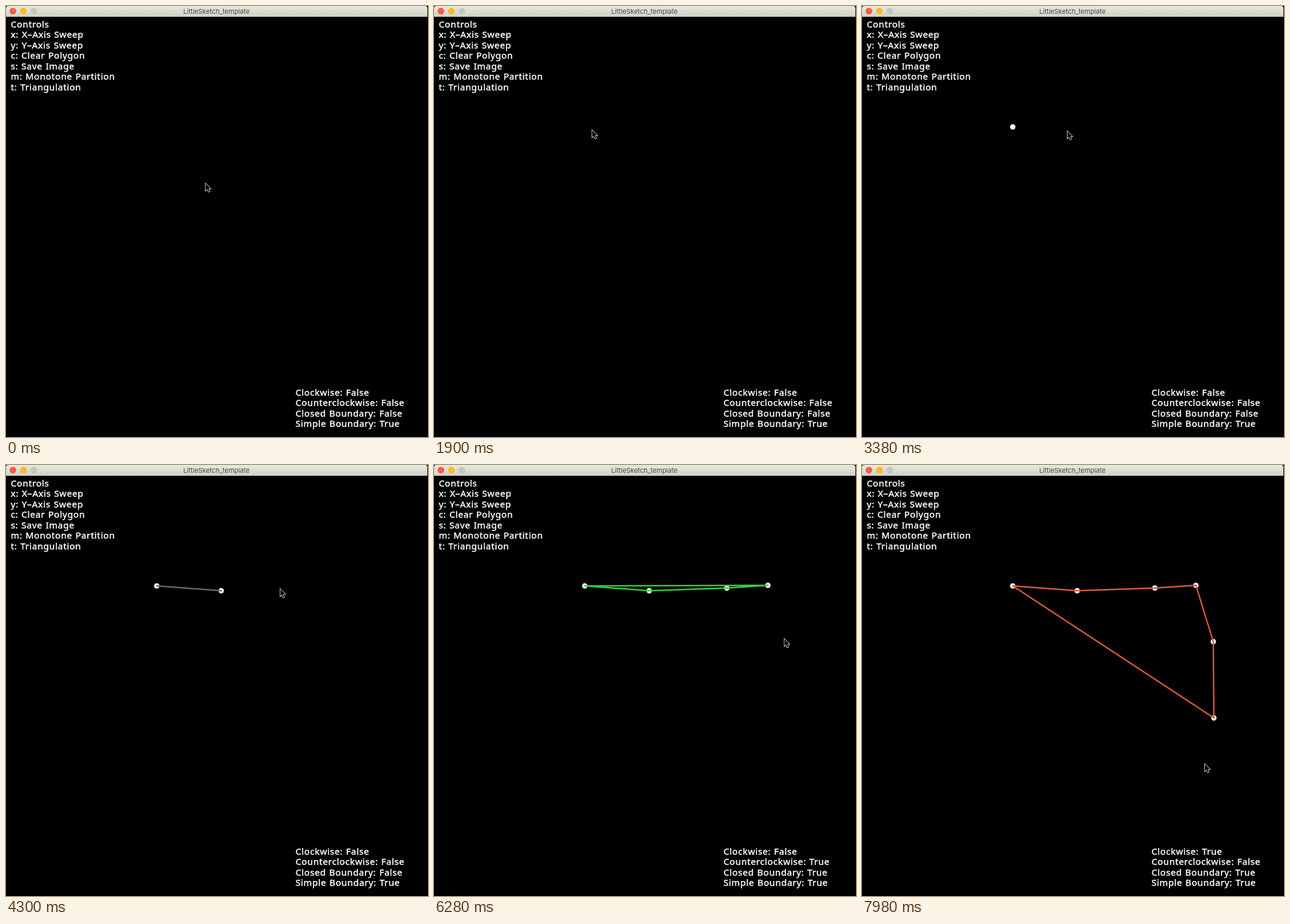
An HTML page with a canvas for the animation above (8000 ms loop, 704 by 720 pixels).

```html
<!DOCTYPE html>
<html lang="en">
<head>
<meta charset="utf-8">
<title>Polygon editor</title>
<style>
  html, body { margin: 0; width: 100%; height: 100%; overflow: hidden; background: #000; }
  canvas { display: block; }
</style>
</head>
<body>
<canvas id="stage" width="704" height="720"></canvas>
<script>
const ctx = document.getElementById('stage').getContext('2d');
const LOOP = 8000;
const WHITE = '#fdfdf6';
const REST_BEFORE = 140, REST_AFTER = 200;

const CONTROLS = [
  'Controls', 'x: X–Axis Sweep', 'y: Y–Axis Sweep', 'c: Clear Polygon',
  's: Save Image', 'm: Monotone Partition', 't: Triangulation'
];

// Where the cursor pauses; a click there adds a vertex
const pause = (time, x, y) => ({ time, x, y });
const click = (time, x, y) => ({ time, x, y, vertex: true });
const ROUTE = [
  pause(400, 333, 296),
  pause(1980, 264, 207),
  click(2450, 251.5, 202),
  click(3760, 359, 210),
  click(4600, 488.5, 205.5),
  click(5440, 557, 201),
  click(6524, 586, 295),
  click(7440, 587, 422.5),
  pause(8120, 572, 499)
];

// The cursor eases from stop to stop, resting around each one
function cursorAt(t) {
  const next = Math.max(1, ROUTE.findIndex(stop => stop.time > t));
  const from = ROUTE[next - 1], to = ROUTE[next];
  const start = from.time + REST_AFTER, end = to.time - REST_BEFORE;
  const u = Math.min(1, Math.max(0, (t - start) / (end - start)));
  const eased = u * u * (3 - 2 * u);
  return [from.x + (to.x - from.x) * eased, from.y + (to.y - from.y) * eased];
}

function dot(x, y, r, color) {
  ctx.fillStyle = color;
  ctx.beginPath();
  ctx.arc(x, y, r, 0, Math.PI * 2);
  ctx.fill();
}

function outline(points, color, width) {
  ctx.beginPath();
  points.forEach(([x, y]) => ctx.lineTo(x, y));
  ctx.closePath();
  ctx.strokeStyle = color;
  ctx.lineWidth = width;
  ctx.stroke();
}

function textBlock(lines, x, baseline) {
  ctx.font = '500 15px "Noto Sans", sans-serif';
  ctx.letterSpacing = '0.6px';
  ctx.wordSpacing = '0.8px';
  ctx.textAlign = 'left';
  ctx.fillStyle = ctx.strokeStyle = WHITE;
  ctx.lineWidth = 0.45;
  lines.forEach((line, i) => {
    const y = baseline + i * 17.55;
    ctx.fillText(line, x, y);
    ctx.strokeText(line, x, y);
  });
}

function titleBar() {
  const shade = ctx.createLinearGradient(0, 0, 0, 18);
  shade.addColorStop(0, '#e7e9e0');
  shade.addColorStop(1, '#cfd1c6');
  ctx.fillStyle = shade;
  ctx.beginPath();
  ctx.roundRect(0, 0, 703, 18, [4, 4, 0, 0]);
  ctx.fill();
  ['#fb5a48', '#fdb924', '#c6c8be'].forEach((color, i) => dot(11.5 + i * 17.5, 8.5, 5.5, color));
  ctx.font = '11px Inter, sans-serif';
  ctx.letterSpacing = ctx.wordSpacing = '0px';
  ctx.textAlign = 'center';
  ctx.fillStyle = '#484844';
  ctx.fillText('LittleSketch_template', 351, 13);
}

function signedArea(points) {
  return points.reduce((sum, [x, y], i) => {
    const [nx, ny] = points[(i + 1) % points.length];
    return sum + x * ny - nx * y;
  }, 0) / 2;
}

function drawCursor(x, y) {
  ctx.save();
  ctx.translate(x, y);
  ctx.lineJoin = 'miter';
  ctx.fillStyle = '#000';
  outline([[0, 0.5], [0, 12.5], [2.7, 10], [4.8, 14.6], [6.8, 13.7], [4.8, 9.2], [8.2, 9]], WHITE, 1.5);
  ctx.fill();
  ctx.restore();
}

function draw(t) {
  ctx.fillStyle = '#000';
  ctx.fillRect(0, 0, 704, 720);
  titleBar();
  textBlock(CONTROLS, 8, 35.5);

  const points = ROUTE.filter(stop => stop.vertex && stop.time <= t).map(({ x, y }) => [x, y]);
  const closed = points.length > 2;
  const area = signedArea(points);
  const clockwise = closed && area > 0, counter = closed && area < 0;
  const label = flag => flag ? 'True' : 'False';
  textBlock([
    'Clockwise: ' + label(clockwise),
    'Counterclockwise: ' + label(counter),
    'Closed Boundary: ' + label(closed),
    'Simple Boundary: True'
  ], 483, 650.5);

  points.forEach(([x, y]) => dot(x, y, 4.5, WHITE));
  ctx.lineJoin = 'round';
  if (points.length > 1) {
    outline(points, clockwise ? '#d65a40' : counter ? '#32cd3c' : '#646464', 2.4);
  }
  drawCursor(...cursorAt(t));
}

function frame() {
  draw(performance.now() % LOOP);
  requestAnimationFrame(frame);
}
frame();
</script>
</body>
</html>
```
